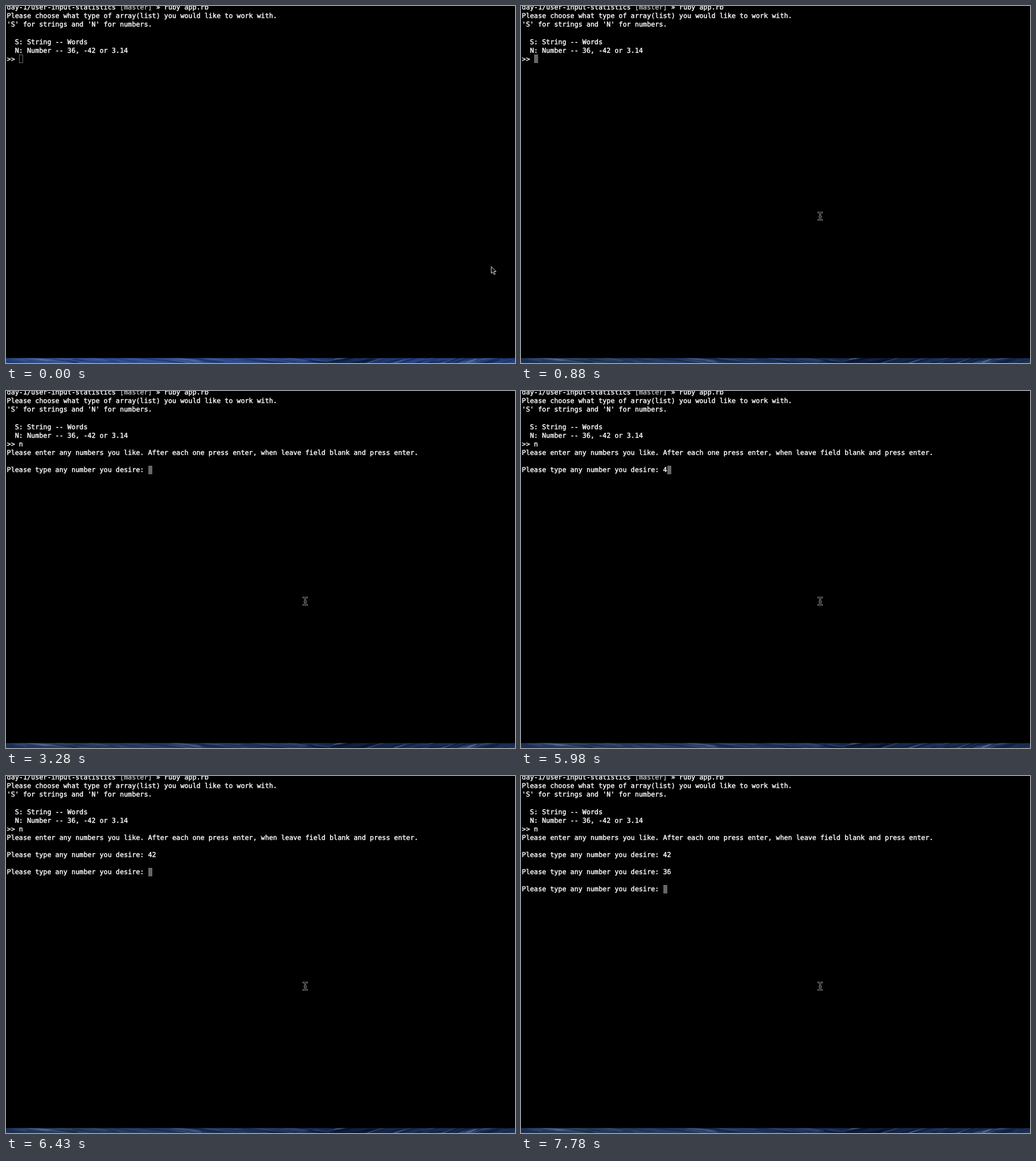
An HTML page for the animation above (8000 ms loop, 894 by 626 pixels).

```html
<!DOCTYPE html>
<html lang="en">
<head>
<meta charset="utf-8">
<title>Terminal session</title>
<style>
  html, body { margin: 0; width: 100%; height: 100%; overflow: hidden; background: #000; }
  svg { display: block; width: 894px; height: 626px; }
  text {
    font: 11.78px "DejaVu Sans Mono", monospace;
    fill: #fff; stroke: #fff; stroke-width: .4px;
    white-space: pre; text-rendering: geometricPrecision;
  }
  .dim { fill: #bcbcbc; stroke: #bcbcbc; }
</style>
</head>
<body>
<svg viewBox="0 0 894 626">
  <defs>
    <linearGradient id="active"></linearGradient>
    <linearGradient id="idle"></linearGradient>
    <clipPath id="edge"><rect y="617" width="894" height="9"/></clipPath>
    <path id="ibeam" d="M-3-6.5Q0-6.5 0-4.5Q0-6.5 3-6.5M0-4.5V4.5M-3 6.5Q0 6.5 0 4.5Q0 6.5 3 6.5M-1 1H1"/>
  </defs>
  <rect width="894" height="626"/>
  <g clip-path="url(#edge)">
    <rect id="sea" y="617" width="894" height="9"/>
    <g id="waves"></g>
    <rect y="617" width="894" height="1" opacity=".35"/>
  </g>
  <g id="lines"></g>
  <rect id="caret"/>
  <path id="arrow" d="M.3 .8V12.8l2.8-2.5 2.1 4.5 2-.9-2.1-4.4h3.7z"
        fill="#000" stroke="#e4e4e4"/>
  <g id="beam" transform="translate(525.5 368.5)" fill="none" stroke-linecap="square">
    <use href="#ibeam" stroke="#d0d0d0" stroke-width="2.6"/>
    <use href="#ibeam" stroke="#000" stroke-width="1.3"/>
  </g>
</svg>
<script>
const LOOP = 8000, FOCUS = 880;
const LEFT = 1.6, COL = 7.092, ROW = 15.08, BASE = 21.4;
const NS = "http://www.w3.org/2000/svg";
const $ = id => document.getElementById(id);

function set(el, attrs) {
  for (const key in attrs) el.setAttribute(key, attrs[key]);
}

function add(parent, tag, attrs, text = "") {
  const el = document.createElementNS(NS, tag);
  set(el, attrs);
  el.textContent = text;
  parent.append(el);
  return el;
}

const ASK = "Please type any number you desire: ";
const INTRO = [
  "Please choose what type of array(list) you would like to work with.",
  "'S' for strings and 'N' for numbers.",
  "",
  "  S: String -- Words",
  "  N: Number -- 36, -42 or 3.14",
  ">> "
].join("\n");

// Terminal output, appended at each time
const OUTPUT = [
  [0, INTRO],
  [2830, "n"],
  [3280, "\nPlease enter any numbers you like. After each one press enter, " +
         "when leave field blank and press enter.\n\n" + ASK],
  [5980, "4"],
  [6130, "2"],
  [6430, "\n\n" + ASK],
  [7330, "36"],
  [7780, "\n\n" + ASK]
];

// Pointer positions: time, x, y
const POINTER = [
  [0, 852, 456], [150, 840, 452], [300, 762, 464],
  [440, 677, 488], [590, 561, 404], [730, 524, 366]
];

const command = add($("lines"), "text", { x: LEFT, y: BASE - ROW });
add(command, "tspan", {}, "day-1/user-input-statistics ");
add(command, "tspan", { class: "dim" }, "[master]");
add(command, "tspan", {}, " » ruby app.rb");

const rows = Array.from({ length: 13 }, (_, i) =>
  add($("lines"), "text", { x: LEFT, y: BASE + i * ROW }));

// Sliver of sea wallpaper under the window
function gradient(id, colors) {
  const stops = [0, .12, .26, .42, .58, .65, .72, .8, .9, 1];
  stops.forEach((offset, i) =>
    add($(id), "stop", { offset, "stop-color": colors[i] }));
}
gradient("idle", ["#26437f", "#34539a", "#345499", "#2b4a90", "#28478a",
                  "#1c3568", "#1a3263", "#26468a", "#203c78", "#26437f"]);
gradient("active", ["#1a3156", "#28425f", "#263f66", "#1d355c", "#1b335c",
                    "#122444", "#112240", "#1a3157", "#162b4e", "#1b3256"]);

let seed = 7;
const random = () => (seed = seed * 16807 % 2147483647) / 2147483647;
for (let i = 0; i < 110; i++) {
  const x = random() * 894, y = 616 + random() * 11;
  const rough = x > 560;
  const tilt = rough ? -8 - random() * 14 : 3 + random() * 7;
  add($("waves"), "ellipse", {
    cx: x, cy: y, rx: 10 + random() * 26, ry: .5 + random() * 1.1,
    fill: random() < (rough ? .35 : .55) ? "#7088b4" : "#020d2a",
    opacity: (rough ? .25 : .12) + random() * .22,
    transform: `rotate(${tilt} ${x} ${y})`
  });
}

function draw(t) {
  const focused = t >= FOCUS;
  const log = OUTPUT.filter(([at]) => at <= t).map(([, s]) => s).join("").split("\n");
  rows.forEach((row, i) => {
    const text = log[i] || "";
    if (row.textContent !== text) row.textContent = text;
  });

  const last = log.length - 1, inset = focused ? 0 : .5;
  set($("caret"), {
    x: Math.round(LEFT + log[last].length * COL) + inset,
    y: Math.round(10 + last * ROW) + inset,
    width: 7 - inset * 2,
    height: 15 - inset * 2,
    fill: focused ? "#666" : "none",
    stroke: focused ? "none" : "#6c6c6c"
  });

  const [, x, y] = POINTER.filter(([at]) => at <= t).pop();
  set($("arrow"), { transform: `translate(${x} ${y})`, visibility: focused ? "hidden" : "visible" });
  set($("beam"), { visibility: focused ? "visible" : "hidden" });
  set($("sea"), { fill: focused ? "url(#active)" : "url(#idle)" });
}

const start = performance.now();
function tick() {
  draw((performance.now() - start) % LOOP);
  requestAnimationFrame(tick);
}
tick();
</script>
</body>
</html>
```
